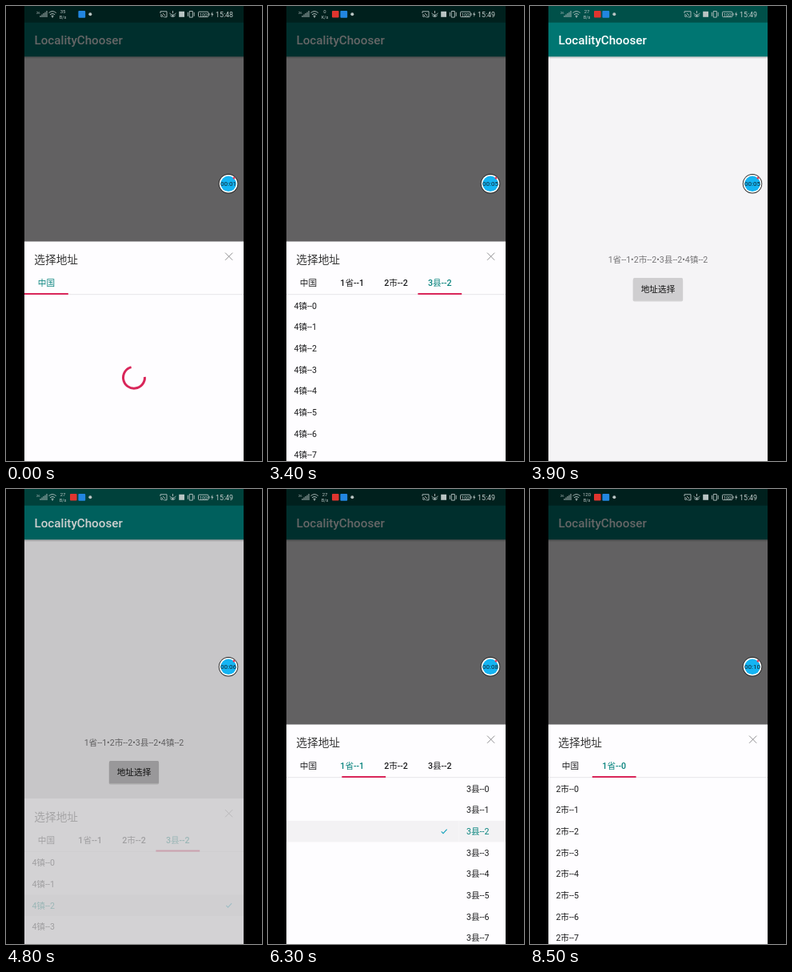
These frames come from a looping animation (320x569 px, 8700 ms). An HTML page:

```html
<!DOCTYPE html>
<html lang="zh-CN">
<head>
<meta charset="utf-8">
<title>选择地址</title>
<style>
  html, body { margin: 0; width: 100%; height: 100%; overflow: hidden; background: #000; }
  svg { display: block; width: 100%; height: 100%; }
  text { font-family: Roboto, "Noto Sans CJK SC", "Noto Sans CJK", sans-serif; font-size: 10.65px; white-space: pre; }
  .mid { text-anchor: middle; }
  .medium { font-weight: 500; }
  .line { fill: none; stroke: #b9c4c3; stroke-width: .9; }
  .solid { fill: #b9c4c3; }
  .accent { stroke: #d9265a; fill: none; stroke-width: 3; }
  .check { fill: none; stroke: #17a3bd; stroke-width: 1.1; }
</style>
</head>
<body>
<svg viewBox="0 0 320 569" preserveAspectRatio="none">
  <defs>
    <clipPath id="screen"><rect x="23" y="0" width="274" height="569"/></clipPath>
    <clipPath id="list"><rect x="23" y="361.3" width="274" height="300"/></clipPath>
    <linearGradient id="shade" x2="0" y2="1">
      <stop stop-opacity=".22"/><stop offset="1" stop-opacity="0"/>
    </linearGradient>
  </defs>

  <g clip-path="url(#screen)">
    <rect x="23" width="274" height="569" fill="#f5f4f6"/>
    <rect x="23" width="274" height="21" fill="#005049"/>
    <rect x="23" y="20.7" width="274" height="42.6" fill="#007672"/>
    <rect x="23" y="63.3" width="274" height="3" fill="url(#shade)"/>
    <text x="35.5" y="48.2" class="medium" style="font-size:15.2px" fill="#fff">LocalityChooser</text>
    <text x="160" y="320.7" class="mid" fill="#767577">1省--1•2市--2•3县--2•4镇--2</text>
    <rect x="128.6" y="341" width="62.6" height="28.6" rx="2" opacity=".14"/>
    <rect x="129" y="340" width="62" height="28" rx="1.5" fill="#cfced0"/>
    <rect id="press" x="129" y="340" width="62" height="28" rx="1.5"/>
    <text x="160" y="358" class="mid medium" fill="#111">地址选择</text>
    <rect id="dim" x="23" width="274" height="569"/>

    <g id="sheet">
      <rect x="23" y="294.5" width="274" height="275" fill="#fefdff"/>
      <text x="35.3" y="322.2" style="font-size:13.7px" fill="#333">选择地址</text>
      <path d="M274 308.6l9.2 9.2m0-9.2l-9.2 9.2" fill="none" stroke="#858487" stroke-width=".9"/>
      <rect x="23" y="360.2" width="274" height="1" fill="#e6e5e8"/>
      <g id="tabs"></g>
      <rect id="bar" y="359" width="54.8" height="2" fill="#d9265a"/>
      <g id="pages" clip-path="url(#list)"></g>
    </g>
  </g>

  <g id="status">
    <text x="38" y="9.5" style="font-size:4px" class="solid">26</text>
    <path class="line" stroke-width="1.2" d="M43 14v-2m2 2v-3.5m2 3.5v-5m2 5v-6.3m2 6.3V6"/>
    <path class="line" d="M53.5 8.6q4.6-4 9.2 0M55 10.7q3.1-2.6 6.2 0M56.6 12.5q1.5-1.2 3 0"/>
    <circle class="solid" cx="58.1" cy="13.6" r=".9"/>
    <g class="mid solid">
      <text id="rate" x="71" y="9.2" style="font-size:6px"></text>
      <text id="unit" x="71" y="16" style="font-size:5.6px"></text>
    </g>
    <rect id="mic" x="80" y="6" width="8.6" height="8.6" rx="1" fill="#e0352f"/>
    <rect x="90.4" y="6" width="8.8" height="8.8" rx="1" fill="#2286e0"/>
    <circle class="solid" cx="105.3" cy="10.3" r="2"/>

    <path class="line" d="M193 9V6.8h8v7h-3.4M193 10.6q3.2 0 3.4 3.4M193 12.4q1.5 0 1.6 1.6M196 9l3 3"/>
    <path class="line" d="M204.5 9q4 4.4 8 0M205.3 11.8q3.2 3.4 6.4 0M208.5 6v3"/>
    <circle class="solid" cx="208.5" cy="12" r="1.1"/>
    <rect class="solid" x="216.2" y="6.8" width="6.8" height="7"/>
    <path class="line" d="M229.3 6.5h4v7.6h-4zM227.4 7.8v5m7.8-5v5"/>
    <rect class="line" x="240.5" y="7.2" width="12.4" height="6.4" rx="1"/>
    <path class="line" d="M254 9v2.8"/>
    <text x="246.7" y="12.6" class="mid solid" style="font-size:6px">100</text>
    <path class="solid" d="M258.4 6.8l-2.3 4h1.6l-.8 3.2 2.5-4.3h-1.6z"/>
    <text id="clock" x="262" y="13.5" style="font-size:8.8px" fill="#c3cccb"></text>
  </g>

  <circle cx="278" cy="222.3" r="12.2" fill="#232323"/>
  <circle cx="278" cy="222.3" r="11.3" fill="#fff"/>
  <circle cx="278" cy="222.3" r="9.7" fill="#14b4f3"/>
  <circle cx="285" cy="215" r="1.5" fill="#e0405a"/>
  <text id="timer" x="278" y="225.2" class="mid" style="font-size:8px" fill="#10222c"></text>
</svg>

<script>
const LOOP = 8700, LEFT = 23, WIDTH = 274, TAB = 54.8, ROW = 26.65, TOP = 361.5;
const TEAL = '#07837d', INK = '#1c1c1e';
const LEVELS = ['1省', '2市', '3县', '4镇'];

// Pager moves: start, duration, from, to
const MOVES = [
  [710, 135, 0, 1], [1710, 135, 1, 2], [2710, 135, 2, 3],
  [5250, 600, 3, 2], [5950, 500, 2, 1], [6550, 750, 1, 0],
  [7810, 135, 0, 1]
];
// Loading spans per page: page, start, end
const LOADS = [[0, -640, 100], [1, 710, 1400], [2, 1710, 2400], [3, 2710, 3400], [1, 7810, 8500]];
const CLOSE = 3750, RESET = 7810;

const $ = id => document.getElementById(id);
const clamp = x => Math.min(1, Math.max(0, x));
const ramp = (t, start, length) => clamp((t - start) / length);
const smooth = x => x * x * (3 - 2 * x);
const easeOut = x => 1 - (1 - x) ** 2;
const show = (node, on) => node.setAttribute('visibility', on ? 'inherit' : 'hidden');
const step = (t, pairs) => pairs.filter(p => t >= p[0]).pop()[1];

function add(parent, tag, attrs, text) {
  const node = document.createElementNS('http://www.w3.org/2000/svg', tag);
  for (const key in attrs) node.setAttribute(key, attrs[key]);
  if (text) node.textContent = text;
  return parent.appendChild(node);
}

function write(node, text) {
  if (node.textContent !== text) node.textContent = text;
}

const tabs = LEVELS.map((_, i) =>
  add($('tabs'), 'text', { x: LEFT + TAB * (i + .5), y: 350.3, class: 'mid medium' }));

const pages = LEVELS.map(level => {
  const root = add($('pages'), 'g', {});
  const rows = add(root, 'g', {});
  const back = add(rows, 'rect', { x: LEFT, width: WIDTH, height: ROW, fill: '#f3f2f4' });
  const labels = Array.from({ length: 8 }, (_, i) =>
    add(rows, 'text', { x: 32.4, y: 378.8 + i * ROW }, `${level}--${i}`));
  const check = add(rows, 'path', { class: 'check' });
  const spinner = add(root, 'path', { class: 'accent' });
  return { root, rows, back, labels, check, spinner };
});

function pagerAt(t) {
  let page = 0;
  for (const [start, length, from, to] of MOVES) {
    if (t < start) break;
    const p = ramp(t, start, length);
    page = from + (to - from) * (to > from ? easeOut(p) : smooth(p));
  }
  return page;
}

// The bar jumps ahead when a tab is added and trails slightly on swipes.
function barAt(t) {
  const last = MOVES.filter(m => t >= m[0]).pop();
  return last && last[3] > last[2] ? last[3] : pagerAt(t - 20);
}

function picksAt(t) {
  const kept = start => t >= start && t < RESET ? 2 : -1;
  return [step(t, [[0, -1], [710, 1], [RESET, 0]]), kept(1710), kept(2710), kept(CLOSE)];
}

function arc(age) {
  const point = deg => {
    const a = deg * Math.PI / 180;
    return `${160 + 13.5 * Math.cos(a)} ${464.7 + 13.5 * Math.sin(a)}`;
  };
  const start = -90 + .135 * age;
  const sweep = 10 + 250 * smooth(clamp(age / 667));
  return `M${point(start)}A13.5 13.5 0 ${sweep > 180 ? 1 : 0} 1 ${point(start + sweep)}`;
}

function drawPage(i, t, pager, pick) {
  const { root, rows, back, labels, check, spinner } = pages[i];
  const shift = (i - pager) * WIDTH;
  show(root, Math.abs(shift) < WIDTH);
  root.setAttribute('transform', `translate(${shift} 0)`);

  const load = LOADS.find(l => l[0] === i && t >= l[1] && t < l[2]);
  show(rows, !load);
  show(spinner, load);
  if (load) spinner.setAttribute('d', arc(t - load[1]));

  const pressed = i === 0 && t >= 550 && t < 710;
  const lit = pressed ? 1 : pick;
  show(back, lit >= 0);
  back.setAttribute('y', TOP + Math.max(0, lit) * ROW);
  show(check, pick >= 0);
  check.setAttribute('d', `M275.2 ${375 + pick * ROW}l2.3 2.4 4.6-5`);
  labels.forEach((label, n) => label.setAttribute('fill', n === pick ? TEAL : INK));
}

function drawSheet(t) {
  const closing = ramp(t, CLOSE, 140);
  const opened = t >= 4600;
  const slide = opened ? easeOut(ramp(t, 4650, 360)) : 1 - closing ** 2;
  const fade = opened ? ramp(t, 4675, 400) : 1 - closing;
  $('dim').setAttribute('opacity', .6 * fade);
  $('sheet').setAttribute('opacity', fade ** 1.3);
  $('sheet').setAttribute('transform', `translate(0 ${(1 - slide) * 274.5})`);
  $('press').setAttribute('opacity', .09 * ramp(t, 3950, 350));

  const picks = picksAt(t), pager = pagerAt(t), bar = barAt(t);
  tabs.forEach((tab, i) => {
    show(tab, i === 0 || picks[i - 1] >= 0);
    write(tab, i ? `${LEVELS[i - 1]}--${picks[i - 1]}` : '中国');
    tab.setAttribute('fill', i === Math.round(bar) ? TEAL : INK);
  });
  $('bar').setAttribute('x', LEFT + bar * TAB);
  picks.forEach((pick, i) => drawPage(i, t, pager, pick));
}

function drawStatus(t) {
  const [rate, unit] = step(t, [[0, '35 B/s'], [1100, '0 K/s'], [3800, '27 B/s'], [7050, '120 B/s']]).split(' ');
  write($('rate'), rate);
  write($('unit'), unit);
  write($('clock'), t < 1200 ? '15:48' : '15:49');
  show($('mic'), t >= 2200);
  write($('timer'), '00:' + String(Math.floor((t + 1900) / 1000)).padStart(2, '0'));
}

const begin = performance.now();
function frame() {
  const t = (performance.now() - begin) % LOOP;
  drawSheet(t);
  drawStatus(t);
  requestAnimationFrame(frame);
}
frame();
</script>
</body>
</html>
```
